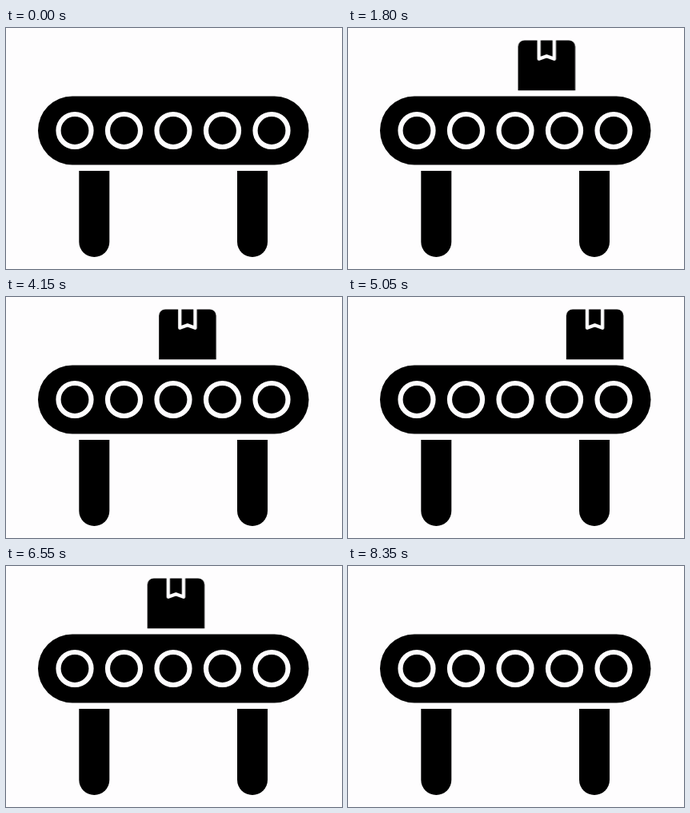
Recreate the animation shown at these times as an HTML page. Size 420 px wide and 302 px high, loop 8450 ms.

```html
<!DOCTYPE html>
<html lang="en">
<head>
<meta charset="utf-8">
<title>Conveyor belt</title>
<style>
  html, body {
    margin: 0;
    width: 100%;
    height: 100%;
    overflow: hidden;
    background: #fefdfe;
  }
  svg { display: block; width: 100%; height: 100%; }
  .cutout { fill: none; stroke: #fefdfe; }
  .parcel {
    animation: ride 8450ms infinite, show 8450ms step-end infinite;
  }

  /* Three trips along the belt, each jumping back to the left end. */
  @keyframes ride {
    0%, 4.024%, 33.397%, 62.794% {
      transform: translateX(73.5px);
      animation-timing-function: cubic-bezier(.53, 0, .46, 1);
    }
    33.396%, 62.793%, 92.189%, 100% {
      transform: translateX(275.5px);
      animation-timing-function: step-end;
    }
  }
  @keyframes show {
    0% { visibility: hidden; }
    3.55% { visibility: visible; }
    92.899%, 100% { visibility: hidden; }
  }
</style>
</head>
<body>
<svg viewBox="0 0 420 302">
  <rect x="40" y="85.5" width="338.5" height="86" rx="43"/>
  <g class="cutout" stroke-width="6.2">
    <circle cx="86" cy="128.5" r="20.5"/>
    <circle cx="147.5" cy="128.5" r="20.5"/>
    <circle cx="209" cy="128.5" r="20.5"/>
    <circle cx="270.5" cy="128.5" r="20.5"/>
    <circle cx="332" cy="128.5" r="20.5"/>
  </g>
  <path id="leg" d="M91.3 179h38v89a19 19 0 0 1-38 0z"/>
  <use href="#leg" x="197.7"/>
  <g class="parcel">
    <path d="M0 78.2V23.5a8 8 0 0 1 8-8h55.5a8 8 0 0 1 8 8v54.7z"/>
    <path class="cutout" stroke-width="4.3" stroke-linejoin="round"
          d="M26.1 14v24.8l9.6-3.6 9.6 3.6V14"/>
  </g>
</svg>
</body>
</html>
```
